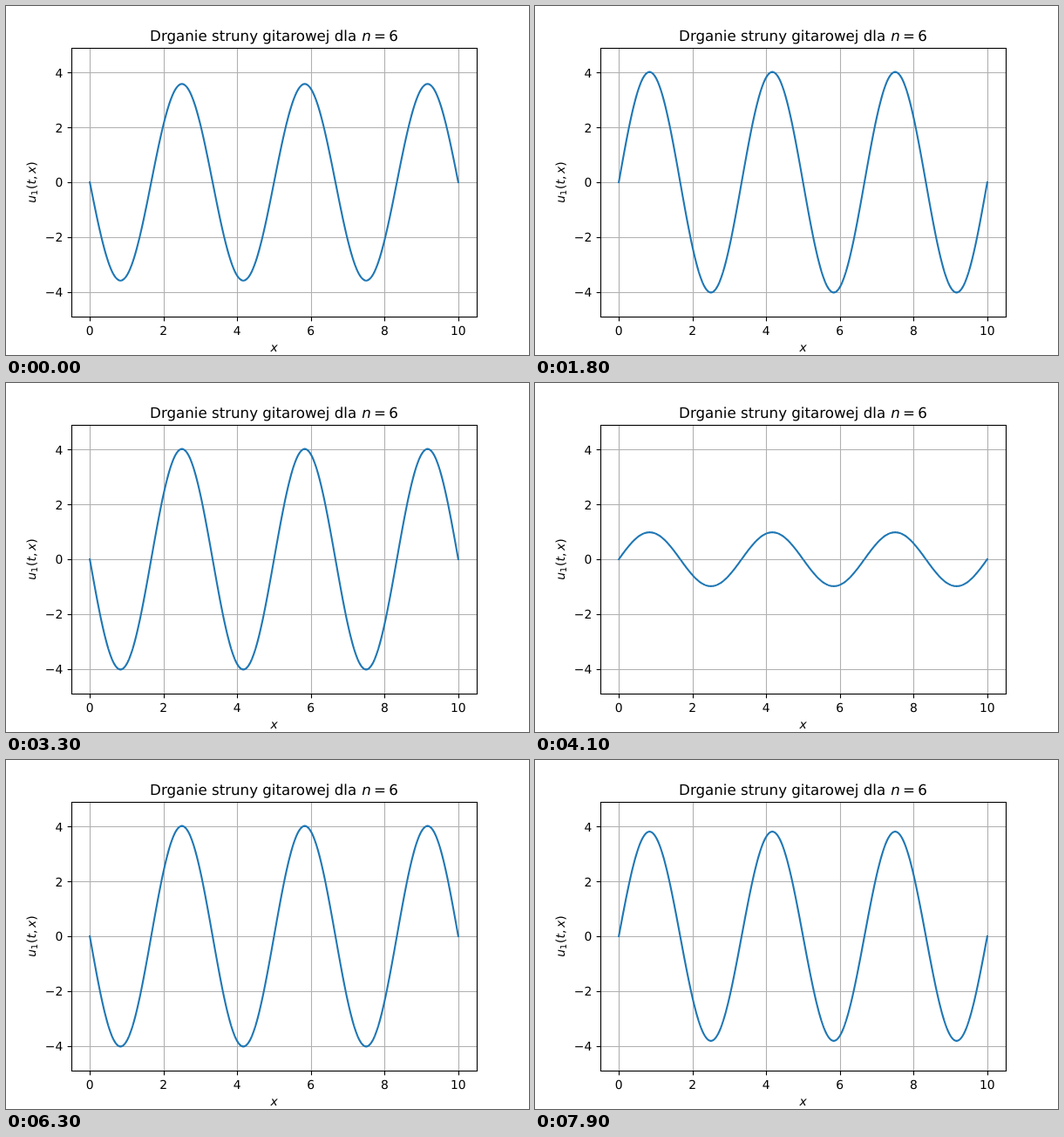
An HTML page for the animation above (8000 ms loop, 600 by 400 pixels).

```html
<!DOCTYPE html>
<html lang="pl">
<head>
<meta charset="utf-8">
<title>Drganie struny</title>
<style>
  html, body { margin: 0; width: 100%; height: 100%; overflow: hidden; background: #fff; }
  svg { display: block; width: 600px; height: 400px; }
  text {
    font: 13.889px "DejaVu Sans", sans-serif;
    text-rendering: geometricPrecision;
    white-space: pre;
  }
  .title { font-size: 16.667px; }
  .sub { font-size: 9.722px; }
  .var { font-style: italic; }
  .grid { stroke: #b0b0b0; stroke-width: 1.11; }
  .axis { stroke: #000; stroke-width: 1.11; fill: none; }
  #wave {
    fill: none; stroke: #1f77b4; stroke-width: 2.083;
    stroke-linecap: square; stroke-linejoin: round;
  }
</style>
</head>
<body>
<svg viewBox="0 0 600 400">
  <g id="grid"></g>
  <path id="wave"/>
  <g id="axes"></g>
</svg>
<script>
const BOX = { left: 75.5, right: 540.5, top: 48.5, bottom: 356.5 };
const X0 = 96.14, X_UNIT = 42.273;
const Y0 = 202, Y_UNIT = 31.4;
const AMPLITUDE = 127.6;           // pixels
const HALF_WAVES = 6, LENGTH = 10;
const STEP_MS = 100, STEPS = 80;
const STEP_ANGLE = Math.PI / 15, PHASE = 28 * Math.PI / 180;
const TICK = 4.86;

const grid = document.getElementById('grid');
const axes = document.getElementById('axes');
const wave = document.getElementById('wave');

const snap = v => Math.floor(v + 0.5) + 0.5;

function add(parent, tag, attrs, content) {
  const el = document.createElementNS('http://www.w3.org/2000/svg', tag);
  for (const key in attrs) el.setAttribute(key, attrs[key]);
  if (content !== undefined) el.textContent = content;
  parent.appendChild(el);
  return el;
}

const line = (parent, cls, x1, y1, x2, y2) =>
  add(parent, 'line', { class: cls, x1, y1, x2, y2 });

const label = (parent, content, x, y, cls = '', anchor = 'start') =>
  add(parent, 'text', { x, y, class: cls, 'text-anchor': anchor }, content);

function drawAxes() {
  for (let v = 0; v <= 10; v += 2) {
    const x = X0 + v * X_UNIT, sx = snap(x);
    line(grid, 'grid', sx, BOX.top, sx, BOX.bottom);
    line(axes, 'axis', sx, BOX.bottom, sx, BOX.bottom + TICK);
    label(axes, v, x, 377, '', 'middle');
  }
  for (let v = -4; v <= 4; v += 2) {
    const y = Y0 - v * Y_UNIT, sy = snap(y);
    line(grid, 'grid', BOX.left, sy, BOX.right, sy);
    line(axes, 'axis', BOX.left - TICK, sy, BOX.left, sy);
    label(axes, String(v).replace('-', '\u2212'), 65.3, Math.round(y + 5.3), '', 'end');
  }
  add(axes, 'rect', {
    class: 'axis', x: BOX.left, y: BOX.top,
    width: BOX.right - BOX.left, height: BOX.bottom - BOX.top
  });
}

function drawTitles() {
  label(axes, 'Drganie struny gitarowej dla', 165.1, 40, 'title');
  label(axes, 'n', 408.3, 40, 'title var');
  label(axes, '=', 422.1, 40, 'title');
  label(axes, '6', 439.3, 40, 'title');
  label(axes, 'x', 307.5, 396, 'var', 'middle');

  const side = add(axes, 'g', { transform: 'translate(34 225.7) rotate(-90)' });
  label(side, 'u', 0, 0, 'var');
  label(side, '1', 8.8, 2.3, 'sub');
  label(side, '(', 15.7, 0);
  label(side, 't', 21.1, 0, 'var');
  label(side, ',', 26.6, 0);
  label(side, 'x', 33.7, 0, 'var');
  label(side, ')', 41.9, 0);
}

function wavePath(height) {
  const count = 300, points = [];
  for (let i = 0; i <= count; i++) {
    const u = i / count;
    const x = X0 + u * LENGTH * X_UNIT;
    const y = Y0 - height * Math.sin(HALF_WAVES * Math.PI * u);
    points.push(x.toFixed(2) + ' ' + y.toFixed(2));
  }
  return 'M' + points.join('L');
}

const start = performance.now();
let shown = -1;

function render() {
  const step = Math.floor((performance.now() - start) / STEP_MS) % STEPS;
  if (step !== shown) {
    shown = step;
    wave.setAttribute('d', wavePath(-AMPLITUDE * Math.cos(step * STEP_ANGLE - PHASE)));
  }
  requestAnimationFrame(render);
}

drawAxes();
drawTitles();
render();
</script>
</body>
</html>
```
